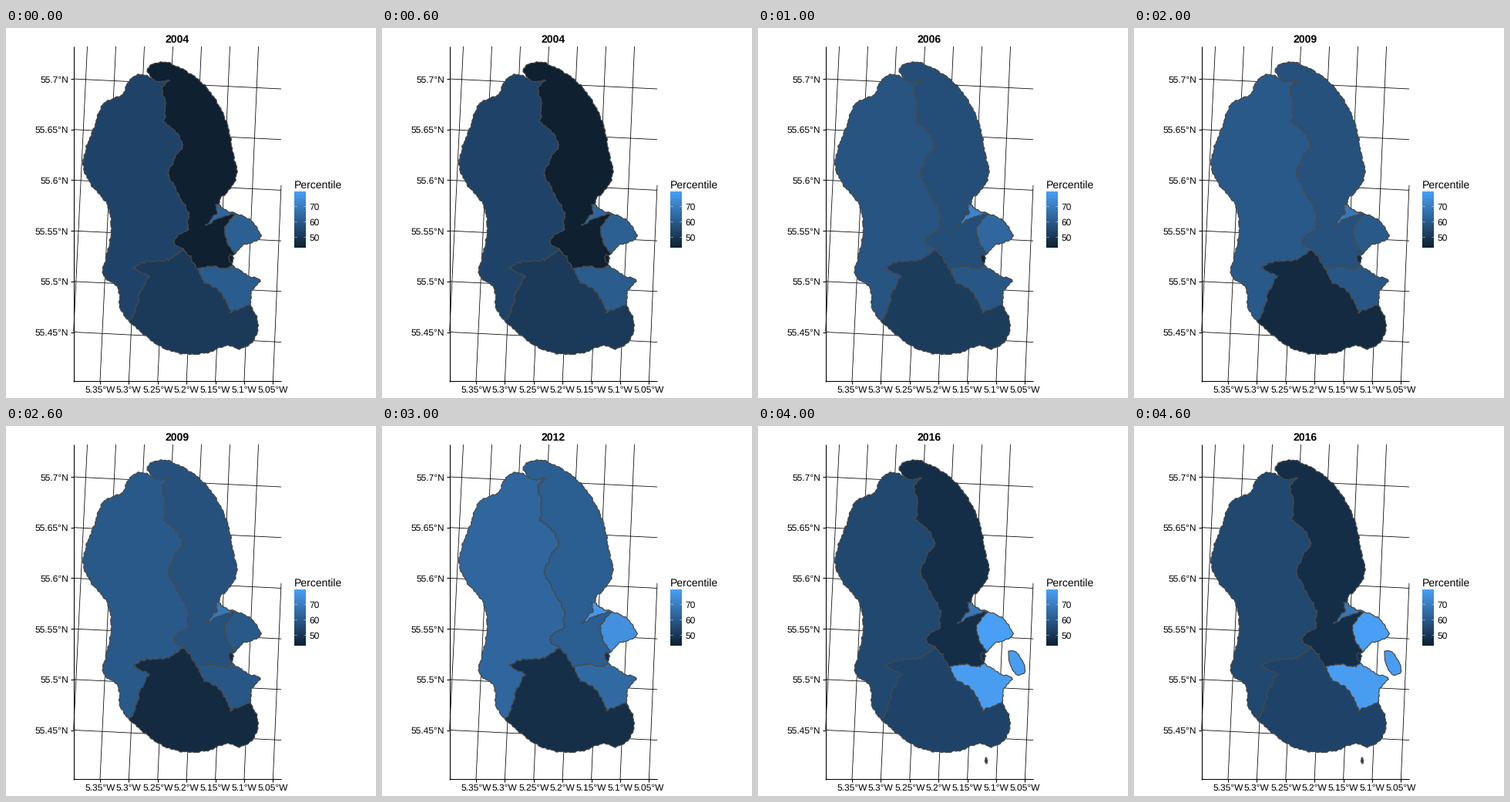
A matplotlib script for the animation above (5 s loop, 480 px wide and 480 px high).

```python
import numpy as np
import matplotlib.pyplot as plt
from matplotlib.animation import FuncAnimation
from matplotlib.colors import LinearSegmentedColormap
from matplotlib.patches import Polygon

SIZE, DPI = 480, 80
PT = 72 / DPI  # points per pixel
YEARS = [2004, 2006, 2009, 2012, 2016]
LEFT, RIGHT, TOP, BOTTOM = 87.7, 357, 24, 458
EDGE = "#484848"
blues = LinearSegmentedColormap.from_list("blues", ["#0f2031", "#499ff5"])
rng = np.random.default_rng(4)

plt.rcParams["font.family"] = "Liberation Sans"
plt.rcParams["text.hinting"] = "none"
fig = plt.figure(figsize=(SIZE / DPI, SIZE / DPI), dpi=DPI, facecolor="white")
ax = fig.add_axes([0, 0, 1, 1])


def curve(*points, smooth=1.0, rough=0.4):
    """Hermite curve through key points (smooth=0: straight), made ragged."""
    p = np.array(points, float)
    knots = np.append(0, np.cumsum(np.hypot(*np.diff(p, axis=0).T)))
    slope = np.gradient(p, knots, axis=0) * smooth
    s = np.union1d(knots, np.arange(0, knots[-1], 1.5))
    i = np.clip(np.searchsorted(knots, s, "right") - 1, 0, len(p) - 2)
    h = (knots[i + 1] - knots[i])[:, None]
    u = (s - knots[i])[:, None] / h
    ease = u * u * (3 - 2 * u)
    xy = p[i] + (p[i + 1] - p[i]) * ease
    xy += h * u * (1 - u) * ((1 - u) * slope[i] - u * slope[i + 1])

    # Sideways ripple that fades at both ends, so borders still meet.
    ripple = sum(np.sin(2 * np.pi * s / wave + rng.uniform(0, 2 * np.pi))
                 for wave in (6, 11, 19))
    fade = np.minimum(1, np.minimum(s, knots[-1] - s) / 4)
    tangent = np.gradient(xy, axis=0)
    normal = tangent[:, ::-1] * [-1, 1]
    normal /= np.hypot(*normal.T)[:, None] + 1e-9
    return xy + normal * (rough * ripple * fade)[:, None]


def border(*points):
    return curve(*points, smooth=0, rough=0.55)


def blob(x, y, rx, ry):
    a = np.linspace(0, 2 * np.pi, 14)
    r = 1 + rng.uniform(-0.25, 0.25, a.size)
    return np.column_stack([x + rx * r * np.cos(a), y + ry * r * np.sin(a)])


def line(x, y, width=1.07, color="black", z=1):
    ax.plot(x, y, color=color, lw=width * PT, zorder=z, solid_capstyle="butt")


def label(x, y, text, size=12, **kw):
    return ax.text(x, y, text, fontsize=size * PT, va="baseline", **kw)


# Junctions where several borders meet
NORTH, SOUTHWEST, CENTRE = (190, 66), (160, 381), (231, 288)
INLET, SPIT, HEAD = (248, 313), (294, 308), (297, 293)
NECK, TIP, BAY_END = (298, 241), (276, 229), (317, 358)

west_coast = curve(
    NORTH, (175, 60), (160, 68), (152, 85), (128, 97), (114, 130), (103, 160),
    (100, 179), (108, 199), (132, 231), (136, 270), (130, 297), (126, 320),
    (145, 337), (149, 366), SOUTHWEST)
north_coast = curve(
    NORTH, (183, 54), (203, 44), (222, 50), (253, 70), (277, 102), (286, 122),
    (294, 160), (299, 192), (286, 214), (279, 220), TIP)
south_coast = curve(
    BAY_END, (327, 385), (322, 404), (304, 416), (288, 412), (262, 421),
    (235, 423), (200, 413), (182, 400), SOUTHWEST)
point_coast = curve(NECK, (314, 247), (330, 272), (305, 284), HEAD)
bay_coast = curve(SPIT, (318, 323), (330, 327), (320, 339), BAY_END)

west_north = border(
    NORTH, (199, 70), (212, 68), (202, 76), (207, 100), (205, 122),
    (222, 136), (230, 152), (218, 170), (210, 190), (237, 240), (236, 262),
    (219, 272), (219, 281), CENTRE)
west_south = border(
    SOUTHWEST, (168, 367), (174, 343), (186, 322), (165, 311), (178, 304),
    (210, 301), CENTRE)
north_south = border(CENTRE, (239, 297), INLET)
bay_north = border(INLET, (262, 309), (288, 312), SPIT)
bay_south = border(
    BAY_END, (292, 369), (283, 350), (273, 337), (258, 331), INLET)
bay_west = border(SPIT, (291, 300), HEAD)
point_west = curve(HEAD, (291, 285), (284, 260), NECK)
sliver_top = border(TIP, (282, 235), NECK)
sliver_low = border(NECK, (280, 245), (259, 256), (274, 240), (272, 230), TIP)
isle = curve((325, 292), (332, 292), (345, 321), (337, 323), (325, 300),
             (325, 292), smooth=0.8, rough=0.2)

# Outline pieces and the position on the colour scale in each year;
# None hides the region.
regions = [
    ([west_coast, west_south, west_north[::-1]],
     [.28, .41, .45, .55, .32]),
    ([west_north, north_south, bay_north, bay_west, point_west,
      sliver_top[::-1], north_coast[::-1]],
     [.00, .36, .39, .49, .11]),
    ([west_south, north_south, bay_south[::-1], south_coast],
     [.20, .22, .08, .12, .28]),
    ([bay_north, bay_coast, bay_south], [.47, .43, .43, .58, .98]),
    ([point_west, point_coast], [.50, .56, .45, .88, 1.0]),
    ([sliver_top, sliver_low], [.55, .78, .68, .93, .68]),
    ([blob(292, 299, 3, 5)], [.00, .05, .08, .12, .11]),
    ([isle], [None] * 4 + [.98]),
    ([blob(296, 434, 1.5, 3.5)], [None] * 4 + [.28]),
]


def draw_grid():
    for i in range(6):
        y = 66 + 65.7 * i
        line([LEFT, RIGHT], [y, y + 13], 0.8)
        line([LEFT - 3.7, LEFT], [y, y])
        label(81, y + 4.4, f"{55.7 - 0.05 * i:.4g}°N", ha="right")
    for i in range(-1, 7):
        x0, x1 = 122 + 37.4 * i, 142.5 + 37 * i
        slope = (x1 - x0) / (BOTTOM - TOP)
        x = np.clip([x0, x1], LEFT, RIGHT)
        line(x, BOTTOM - (x - x0) / slope, 0.8)
        if i >= 0:
            line([x0, x0], [BOTTOM, BOTTOM + 3.7])
            label(x0, 473, f"{5.35 - 0.05 * i:.3g}°W", ha="center")
    line([LEFT, LEFT], [TOP, BOTTOM + 0.5])
    line([LEFT - 0.5, RIGHT], [BOTTOM, BOTTOM])


def draw_legend():
    x0, x1, y0, y1 = 374, 389, 212.5, 285
    label(374, 208, "Percentile", 14)
    ax.imshow(np.linspace(1, 0, 256)[:, None], cmap=blues, aspect="auto",
              extent=[x0, x1, y1, y0], interpolation="bilinear")
    for i, value in enumerate((70, 60, 50)):
        y = 231 + 20 * i
        line([x0, x0 + 3], [y, y], 0.5, "white", 3)
        line([x1 - 3, x1], [y, y], 0.5, "white", 3)
        label(393.5, y + 4.4, str(value))


draw_grid()
draw_legend()
ax.set_xlim(0, SIZE)
ax.set_ylim(SIZE, 0)
ax.axis("off")

shapes = []
for parts, levels in regions:
    shape = Polygon(np.vstack(parts), closed=True, ec=EDGE, lw=1.2 * PT,
                    joinstyle="round", zorder=4)
    ax.add_patch(shape)
    shapes.append((shape, levels))
title = label(222.5, 18.6, "", 14, ha="center", weight="bold")


def update(k):
    title.set_text(str(YEARS[k]))
    for shape, levels in shapes:
        level = levels[k]
        shape.set_visible(level is not None)
        if level is not None:
            shape.set_facecolor(blues(float(level)))
    return [title] + [s for s, _ in shapes]


anim = FuncAnimation(fig, update, frames=len(YEARS), interval=1000,
                     repeat=True, repeat_delay=0, blit=False)
plt.show()
```
